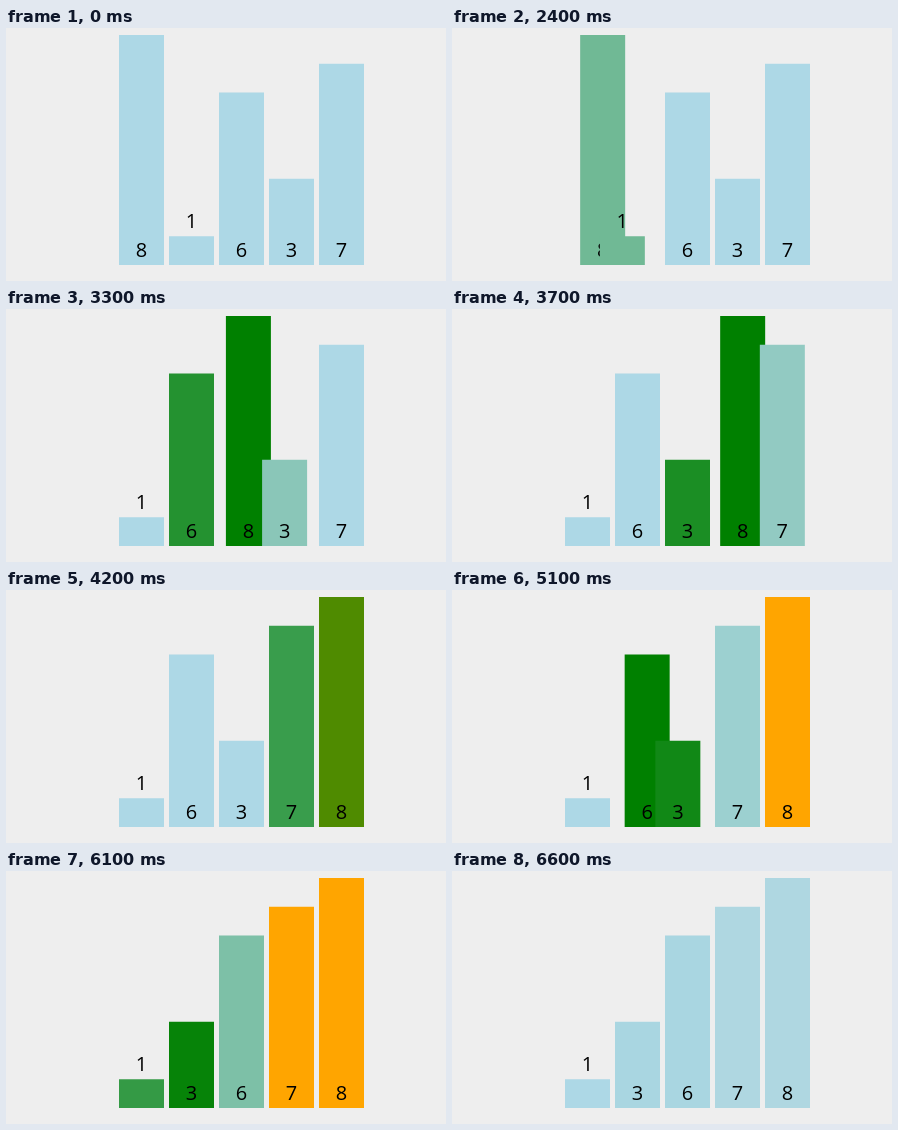
Write an HTML page with a canvas that moves like this. It is 440 px wide and 253 px high and loops after 7.9 s.

```html
<!DOCTYPE html>
<html lang="en">
<head>
<meta charset="utf-8">
<title>Bubble sort</title>
<style>
  html, body { margin: 0; width: 100%; height: 100%; overflow: hidden; background: #eee; }
  canvas { display: block; }
</style>
</head>
<body>
<canvas id="stage" width="440" height="253"></canvas>
<script>
const ctx = document.getElementById('stage').getContext('2d');
const LOOP = 7900, FADE = 145;
const LEFT = 113, PITCH = 50, WIDTH = 45, BOTTOM = 237, UNIT = 28.75;
const BLUE = [173, 216, 230], GREEN = [0, 128, 0], ORANGE = [255, 165, 0];

// Bars in stacking order, each with its colour changes [start, colour].
const bars = [
  { value: 8, tints: [[2349, GREEN], [4155, ORANGE], [6458, BLUE]] },
  { value: 1, tints: [[2349, GREEN], [2772, BLUE], [4530, GREEN], [4655, BLUE],
                      [5960, GREEN], [6060, BLUE]] },
  { value: 6, tints: [[2772, GREEN], [3270, BLUE], [4530, GREEN], [5560, BLUE],
                      [6060, GREEN], [6458, BLUE]] },
  { value: 3, tints: [[3271, GREEN], [3677, BLUE], [4655, GREEN], [5086, BLUE],
                      [5960, GREEN], [6458, BLUE]] },
  { value: 7, tints: [[3677, GREEN], [4152, BLUE], [5086, GREEN], [5561, ORANGE],
                      [6458, BLUE]] }
];

// Swaps: [start, value moving right, value moving left].
const swaps = [[2356, 8, 1], [2780, 8, 6], [3280, 8, 3], [3685, 8, 7], [5072, 6, 3]];

// The picture updates in bursts of 100 ms steps: [start, count].
const bursts = [[0, 1], [2400, 3], [2800, 3], [3300, 3], [3700, 3], [4200, 2], [4600, 1],
                [4800, 1], [5000, 4], [5600, 2], [6000, 3], [6500, 2]];

function stepTime(t) {
  const [start, count] = bursts.filter(b => b[0] <= t).pop();
  return start + 100 * Math.min(count - 1, Math.floor((t - start) / 100));
}

const progress = (t, start) => Math.min(1, Math.max(0, (t - start) / FADE));

function tintAt(bar, t) {
  return bar.tints.reduce((from, [start, to]) => {
    const p = progress(t, start);
    return from.map((c, i) => c + (to[i] - c) * p);
  }, BLUE);
}

function slotAt(bar, index, t) {
  return swaps.reduce((slot, [start, right, left]) => {
    const dir = (bar.value === right) - (bar.value === left);
    return slot + dir * progress(t, start);
  }, index);
}

function draw(t) {
  ctx.fillStyle = '#eee';
  ctx.fillRect(0, 0, 440, 253);
  ctx.font = '20px "Open Sans", "Noto Sans", sans-serif';
  ctx.textAlign = 'center';
  bars.forEach((bar, i) => {
    const x = LEFT + PITCH * slotAt(bar, i, t);
    const height = bar.value * UNIT;
    ctx.fillStyle = `rgb(${tintAt(bar, t).map(Math.round)})`;
    ctx.fillRect(x, BOTTOM - height, WIDTH, height);
    ctx.fillStyle = '#000';
    ctx.fillText(bar.value, x + WIDTH / 2, bar.value === 1 ? 200 : 229);
  });
}

function tick() {
  draw(stepTime(performance.now() % LOOP));
  requestAnimationFrame(tick);
}
tick();
</script>
</body>
</html>
```
